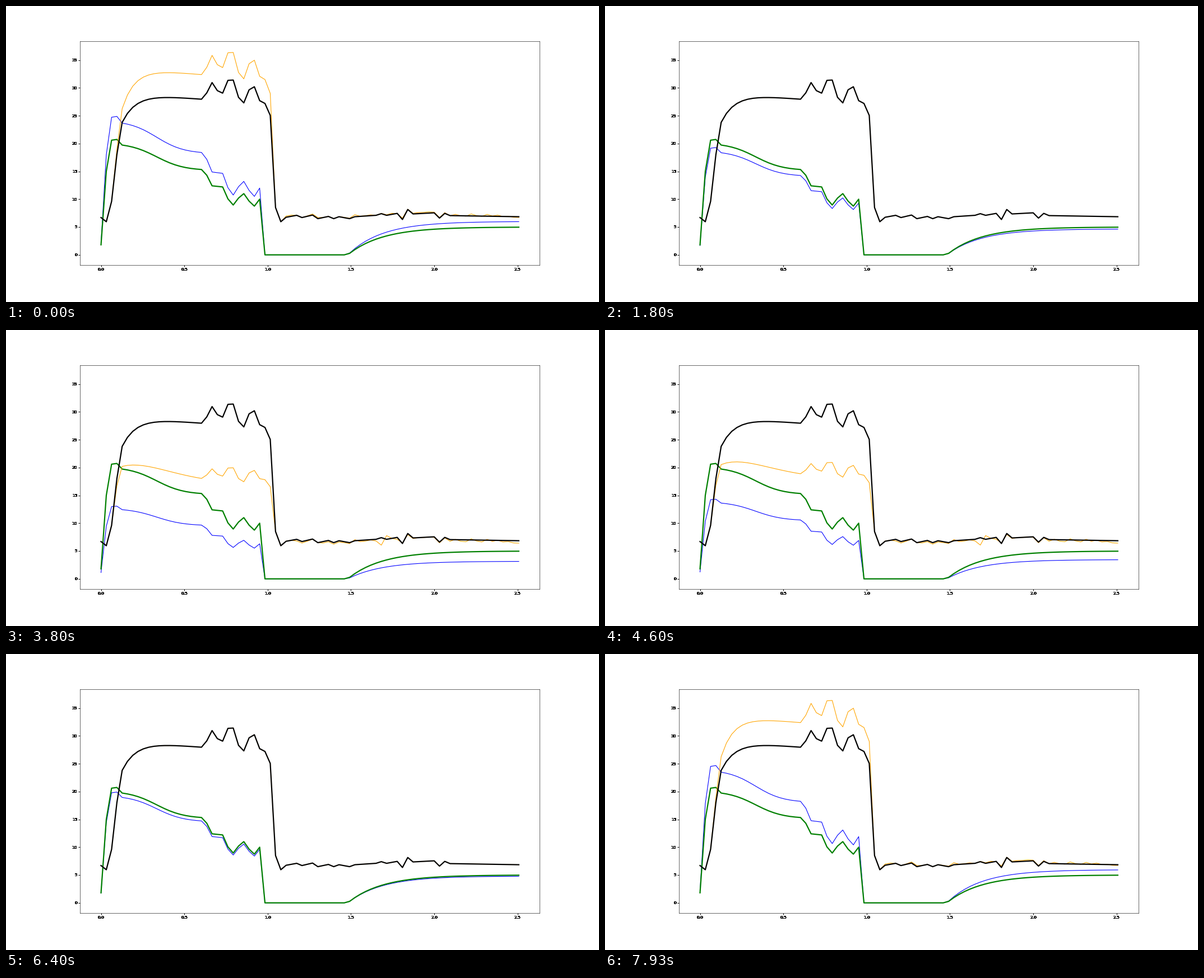
Write a matplotlib script that moves like this. It is 1058x529 px and loops after 7990 ms.

```python
import numpy as np
import matplotlib.pyplot as plt
from matplotlib.animation import FuncAnimation

FRAMES, LOOP_MS = 120, 7990
N = 80
DPI = 52.9
PX = 72 / DPI
i = np.arange(N)
t = i * 2 / 63


def corners(*points):
    """Straight runs between (index, value) corners."""
    x, y = zip(*points)
    return np.interp(i, x, y)


# response: quick rise to a plateau, a bumpy end, then a quiet tail
plateau = 29.1 - 5.3 * np.exp(-(i - 4) / 2.6) - 0.075 * (i - 4)
edges = corners(
    (0, 6.7), (1, 5.95), (2, 9.6), (3, 18), (20, 29.1), (21, 30.95),
    (22, 29.5), (23, 29.05), (24, 31.35), (25, 31.4), (26, 28.3), (27, 27.3),
    (28, 29.65), (29, 30.2), (30, 27.7), (31, 27.2), (32, 25.05), (33, 8.5),
    (34, 5.95), (35, 6.75), (37, 7.1), (38, 6.7), (40, 7.15), (41, 6.5),
    (43, 6.9), (44, 6.5), (45, 6.85), (47, 6.5), (48, 6.85), (52, 7.1),
    (53, 7.4), (54, 7.1), (56, 7.45), (57, 6.35), (58, 8.15), (59, 7.35),
    (63, 7.55), (64, 6.6), (65, 7.45), (66, 7.05), (79, 6.85))
black = np.where((i > 3) & (i < 20), plateau, edges)

# input: sliding burst, silence, slow recovery towards 5
slide = 15.15 + 4.95 / (1 + np.exp((i - 10.5) / 2.6))
steps = corners(
    (0, 1.8), (1, 15), (2, 20.6), (3, 20.73), (20, 14.3), (21, 12.4),
    (23, 12.2), (24, 10.05), (25, 8.95), (26, 10.2), (27, 11), (28, 9.65),
    (29, 8.75), (30, 10), (31, 0))
recovery = 5 * (1 - np.exp(-np.maximum(i - 46.65, 0) / 6.45))
green = np.where((i > 3) & (i < 20), slide, steps) + recovery

# how the prediction strays from the response
rise = 1 - np.exp(-np.maximum(i - 2.4, 0) / 1.5)
gate = np.where(i < 33, rise, 0)
arch = np.sin(np.pi * (i - 4) / 40)
in_tail = i > 34
jitter = np.random.default_rng(4).normal(0, 0.8, N) * in_tail
glitch = corners((52, 0), (53, -1.15), (54, 0.8), (55, 0))

# frame, flat loss, arched loss (fractions of the response)
key_k, key_flat, key_arch = np.array([
    (0, -.158, 0), (12, -.152, 0), (20, 0, 0), (33, 0, 0),
    (36, .003, .011), (40, .03, .115), (48, .11, .123), (57, .23, .135),
    (61, .243, .14), (72, .197, .119), (80, .10, .07), (84, .01, .007),
    (87, 0, 0), (100, 0, 0), (108, -.152, 0), (119, -.158, 0)]).T


def factor(k):
    return 0.6 + 0.01 * abs(60 - k)


def prediction(k):
    flat = np.interp(k, key_k, key_flat)
    bend = np.interp(k, key_k, key_arch)
    loss = flat + bend
    body = black * (1 - gate * (flat + bend * arch))
    noise = jitter * min(abs(loss), 0.2) - 0.6 * flat * in_tail
    return body + noise + glitch * np.clip(loss / 0.15, 0, 1)


plt.rcParams["font.family"] = "DejaVu Sans"
fig = plt.figure(figsize=(20, 10), dpi=DPI, facecolor="white")
ax = fig.add_axes([0.125, 0.125, 0.775, 0.755])

blue_line, = ax.plot(t, green * factor(0), color="blue", lw=1.5)
ax.plot(t, green, color="green", lw=3)
orange_line, = ax.plot(t, prediction(0), color="orange", lw=1.5)
ax.plot(t, black, color="black", lw=3)

pad_x, pad_y = 0.05 * t[-1], 0.05 * 36.5
ax.set_xlim(-pad_x, t[-1] + pad_x)
ax.set_ylim(-pad_y, 36.5 + pad_y)
xticks = np.arange(0, 2.6, 0.5)
yticks = np.arange(0, 36, 5)
ax.set_xticks(xticks, [""] * len(xticks))
ax.set_yticks(yticks, [""] * len(yticks))
ax.tick_params(width=PX, length=3.5)

# stacked copies give the labels their heavy, hard edges
tx, vx, hx = ax.get_xaxis_text1_transform(7)
ty, vy, hy = ax.get_yaxis_text1_transform(7)
for _ in range(20):
    for v in xticks:
        ax.text(v, 0, f"{v:.1f}", transform=tx, va=vx, ha=hx, fontsize=10)
    for v in yticks:
        ax.text(0, v, f"{v}", transform=ty, va=vy, ha=hy, fontsize=10)


def update(k):
    blue_line.set_ydata(green * factor(k))
    orange_line.set_ydata(prediction(k))
    return blue_line, orange_line


anim = FuncAnimation(fig, update, frames=FRAMES, interval=LOOP_MS / FRAMES,
                     init_func=lambda: update(0), repeat=True, repeat_delay=0)
plt.show()
```
